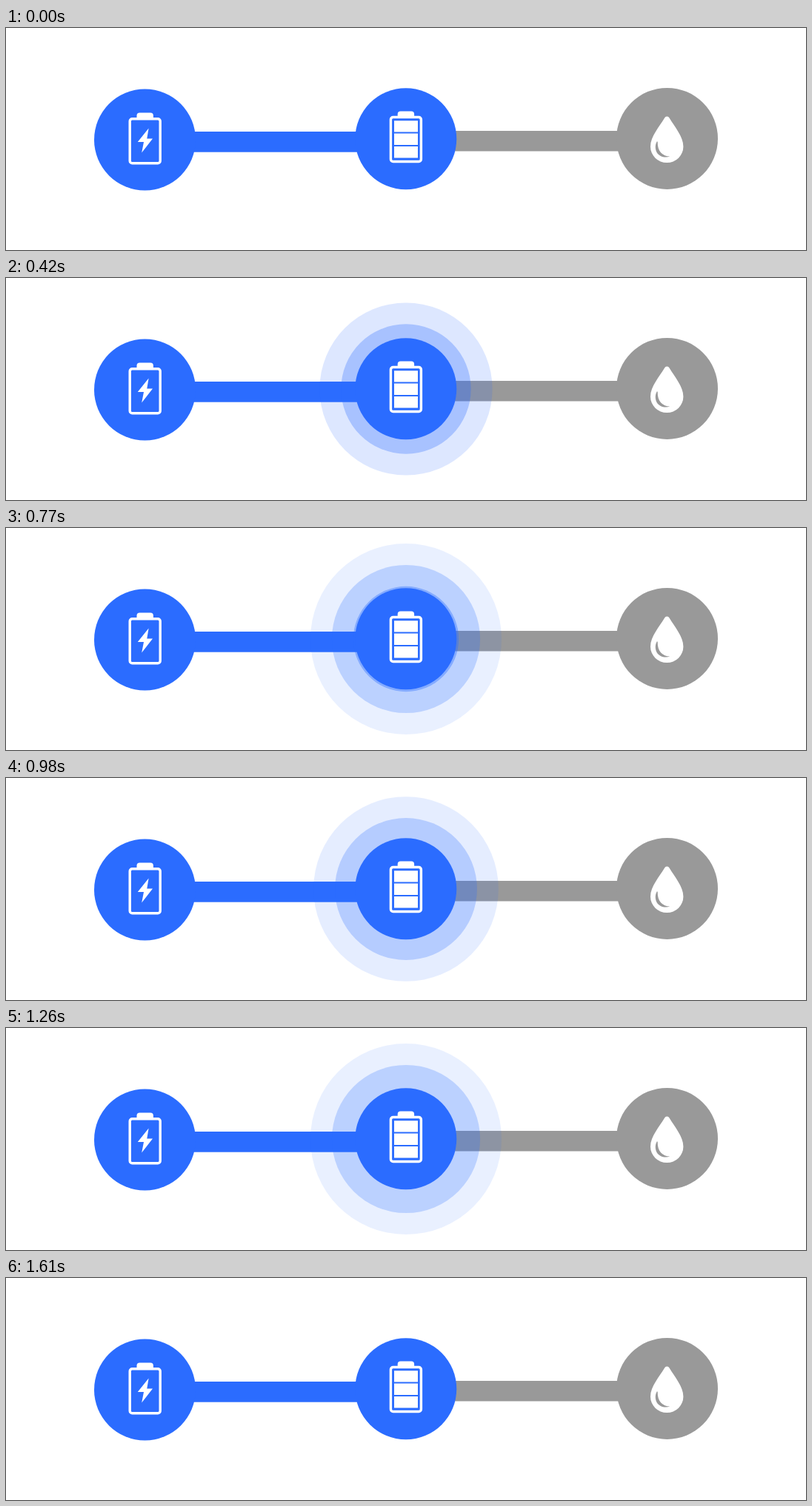
Write an HTML page that moves like this. It is 1080x300 px and loops after 1640 ms.

```html
<!DOCTYPE html>
<html lang="en">
<head>
<meta charset="utf-8">
<title>Charging steps</title>
<style>
  html, body { margin: 0; width: 100%; height: 100%; overflow: hidden; background: #fff; }
  svg { display: block; width: 100%; height: 100%; }
  .on { fill: #2b6cff; }
  .off { fill: #999; }
  .icon { fill: #fff; }
  .frame { fill: none; stroke: #fff; stroke-width: 3.4; }
</style>
</head>
<body>
<svg viewBox="0 0 1080 300">
  <defs>
    <g id="battery">
      <rect class="frame" x="-20.5" y="-28.3" width="41" height="60" rx="3.2"/>
      <path class="icon" d="M-11.2-29v-3.4a4 4 0 0 1 4-4H7.2a4 4 0 0 1 4 4V-29z"/>
    </g>
  </defs>

  <rect class="on" x="187" y="140" width="353" height="27.7"/>
  <rect class="off" x="540" y="139" width="352" height="27.5"/>
  <g id="rings" class="on"></g>

  <circle class="on" cx="187.5" cy="151" r="68.5"/>
  <use href="#battery" x="187.7" y="151"/>
  <path class="icon" d="M192.6 135.5L177.8 154h8.2l-2.8 14.6L198 149.6h-7.7z"/>

  <circle class="on" cx="539.8" cy="149.8" r="68.5"/>
  <use href="#battery" x="539.9" y="148.8"/>
  <path class="icon" d="M524 125.2h32v15.4h-32zM524 142.6h32v15.4h-32zM524 160h32v15.4h-32z"/>

  <circle class="off" cx="892.5" cy="149.4" r="68.5"/>
  <path class="icon" d="M892.3 119.4c-1.4 0-2.4.9-3.2 2.2C882.2 133 870 147 870 160.2a22.2 21.9 0 0 0 44.4 0C914.4 147 902.4 133 895.5 121.6c-.8-1.3-1.8-2.2-3.2-2.2z"/>
  <path class="off" d="M878.7 153.4C875.2 159.5 876.6 167.6 881.6 171.4C886 174.9 892 175.4 896.2 173.4C886.5 173.4 879.3 166.5 879.7 154.2C879.7 153.3 879 153 878.7 153.4z"/>
</svg>
<script>
  const LOOP = 1640, STEP = 70;
  const COUNT = 5, GAP = 245;     // a new ring every GAP ms
  const GROW = 525, FADE = 105;   // expand, then fade out in place
  const R0 = 67, R1 = 129;

  const group = document.getElementById('rings');
  const rings = Array.from({ length: COUNT }, () => {
    const c = document.createElementNS('http://www.w3.org/2000/svg', 'circle');
    c.setAttribute('cx', 540);
    c.setAttribute('cy', 150);
    group.append(c);
    return c;
  });

  const clamp = v => Math.min(1, Math.max(0, v));

  function draw(ms) {
    const t = Math.floor(ms % LOOP / STEP) * STEP;
    rings.forEach((ring, i) => {
      const age = t - i * GAP;
      const grow = clamp(age / GROW);
      const fade = clamp((age - GROW) / FADE);
      const alpha = age < 0 ? 0 : (0.4 - 0.3 * grow) * (1 - fade);
      ring.setAttribute('r', R0 + (R1 - R0) * grow);
      ring.setAttribute('fill-opacity', alpha);
    });
  }

  const start = performance.now();
  function tick() {
    draw(performance.now() - start);
    requestAnimationFrame(tick);
  }
  tick();
</script>
</body>
</html>
```
